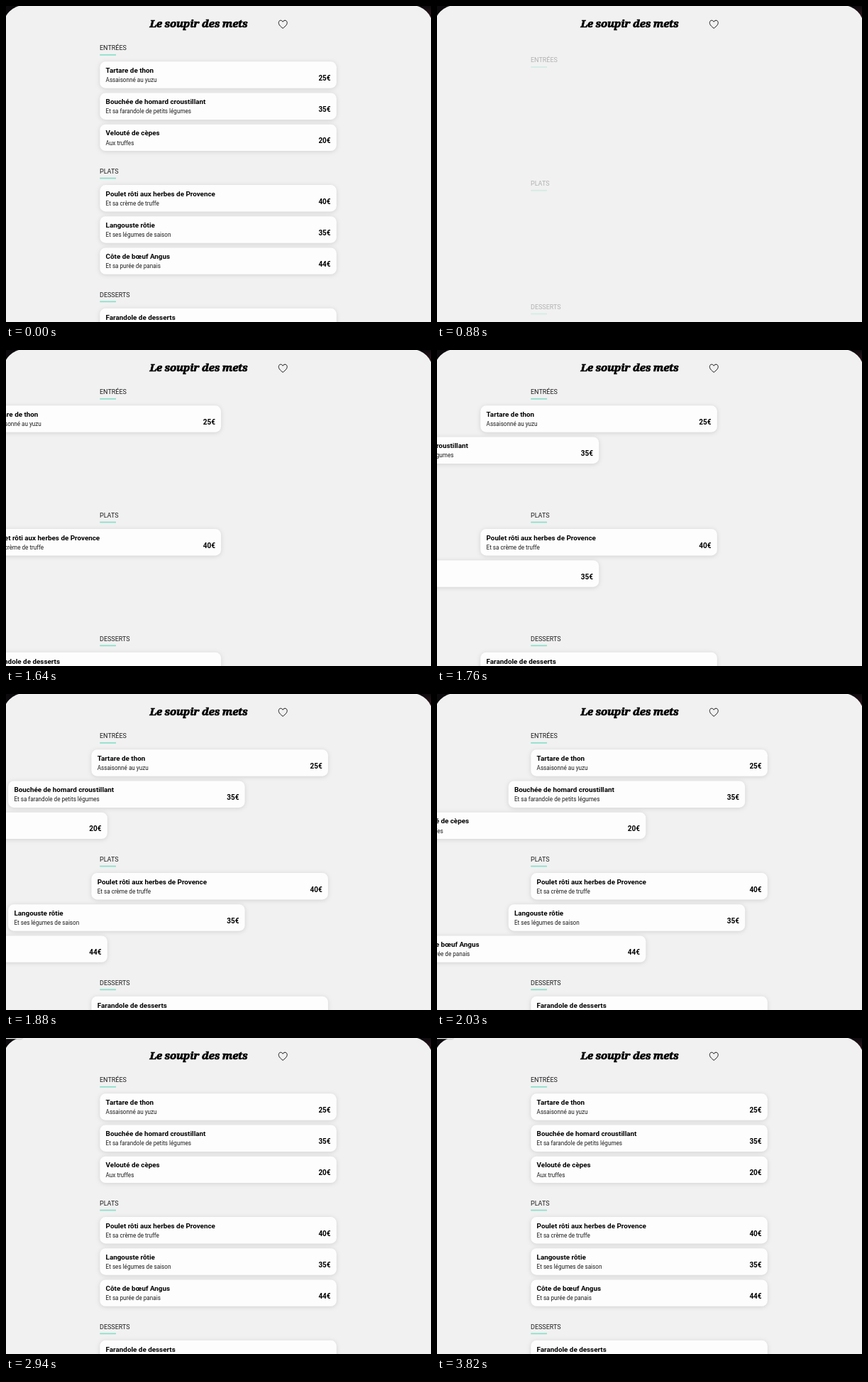
An HTML page that plays this animation: 599x445 px, repeating every 4030 ms.

```html
<!DOCTYPE html>
<html lang="fr">
<head>
<meta charset="utf-8">
<title>Menu</title>
<style>
  html, body { margin: 0; width: 100%; height: 100%; overflow: hidden; background: #0c0a0d; }
  svg { display: block; width: 599px; height: 445px; font-family: Roboto, Arial, sans-serif; }
  .sheet { fill: #f1f1f1; }
  .name { font: italic 900 15px "Noto Serif", serif; letter-spacing: -.2px; text-anchor: middle;
          stroke: #000; stroke-width: .7px; }
  .heart { fill: none; stroke: #111; stroke-width: 1px; stroke-linejoin: round; }
  .head text { font-size: 9px; fill: #1c1c1c; }
  .head rect { fill: #8fdfcb; }
  .card rect { fill: #fdfdfd; filter: drop-shadow(0 1.5px 3px rgba(0, 0, 0, .13)); }
  .dish { font-size: 9.85px; font-weight: 700; }
  .note { font-size: 8.15px; fill: #1c1c1c; }
  .price { font-size: 10px; font-weight: 700; text-anchor: end; }
  .tab { fill: #e6e6e6; filter: drop-shadow(0 .5px 1px rgba(0, 0, 0, .4)); }

  /* One loop is 4030 ms; cards of a section follow each other by 200 ms */
  .head { animation: rise 4030ms linear infinite; }
  .cards { animation: blank 4030ms step-end infinite; }
  .card { animation: slide 4030ms linear calc(var(--i) * 200ms) infinite backwards; }
  .tab { animation: tab 4030ms step-end infinite; }

  @keyframes rise {
    0% { opacity: 1; transform: none; animation-timing-function: step-end; }
    2.978% { opacity: 0; transform: translateY(24.5px); animation-timing-function: step-end; }
    17.37% { opacity: 0; transform: translateY(24.5px); animation-timing-function: ease-out; }
    40.695%, 100% { opacity: 1; transform: none; }
  }
  @keyframes blank {
    0% { visibility: visible; }
    2.978% { visibility: hidden; }
    36.526%, 100% { visibility: visible; }
  }
  /* Each card stays transparent until its own slide begins */
  @keyframes slide {
    0% { opacity: 1; transform: translateX(0); animation-timing-function: step-end; }
    2.978% { opacity: 0; transform: translateX(-333.5px); animation-timing-function: step-end; }
    36.526% { opacity: 1; transform: translateX(-333.5px); animation-timing-function: ease-out; }
    48.437%, 100% { opacity: 1; transform: translateX(0); }
  }
  @keyframes tab {
    0% { visibility: hidden; }
    61.538%, 100% { visibility: visible; }
  }
</style>
</head>
<body>
<svg viewBox="0 0 599 445">
  <defs>
    <linearGradient id="edge" x2="0" y2="1">
      <stop offset="0" stop-color="#0c0a0d"/>
      <stop offset="1" stop-color="#3a1d26"/>
    </linearGradient>
  </defs>
  <rect x="560" width="39" height="20" fill="url(#edge)"/>
  <rect class="sheet" x="-4" y="-1" width="605.5" height="500" rx="30"/>
  <rect class="tab" x="-10" y="-10" width="33" height="11.3" rx="2"/>
  <text class="name" x="271.5" y="30.2">Le soupir des mets</text>
  <path class="heart" d="M390.2 31.4C386 28.2 384.3 26 384.3 23.6C384.3 20 388.4 18.9 390.2 22.3C392 18.9 396.2 20 396.2 23.6C396.2 26 394.4 28.2 390.2 31.4Z"/>
  <g id="menu"></g>
</svg>
<script>
  const menu = [
    ["ENTRÉES", [
      ["Tartare de thon", "Assaisonné au yuzu", "25€"],
      ["Bouchée de homard croustillant", "Et sa farandole de petits légumes", "35€"],
      ["Velouté de cèpes", "Aux truffes", "20€"]]],
    ["PLATS", [
      ["Poulet rôti aux herbes de Provence", "Et sa crème de truffe", "40€"],
      ["Langouste rôtie", "Et ses légumes de saison", "35€"],
      ["Côte de bœuf Angus", "Et sa purée de panais", "44€"]]],
    ["DESSERTS", [["Farandole de desserts", "", ""]]]
  ];

  const card = ([dish, note, price], i, y) => `
    <g class="card" style="--i:${i}">
      <rect x="132.3" y="${y}" width="333.5" height="37.4" rx="8"/>
      <text class="dish" x="140.6" y="${y + 15.7}">${dish}</text>
      <text class="note" x="140.6" y="${y + 28.8}">${note}</text>
      <text class="price" x="457.6" y="${y + 26.7}">${price}</text>
    </g>`;

  const section = ([title, dishes], n) => {
    const y = n * 173.75;
    return `
      <g class="head">
        <text x="132" y="${y + 62}">${title}</text>
        <rect x="132.2" y="${y + 67.9}" width="22.8" height="1.8"/>
      </g>
      <g class="cards">${dishes.map((d, i) => card(d, i, y + 78.3 + i * 44.2)).join("")}</g>`;
  };

  document.getElementById("menu").innerHTML = menu.map(section).join("");
</script>
</body>
</html>
```
